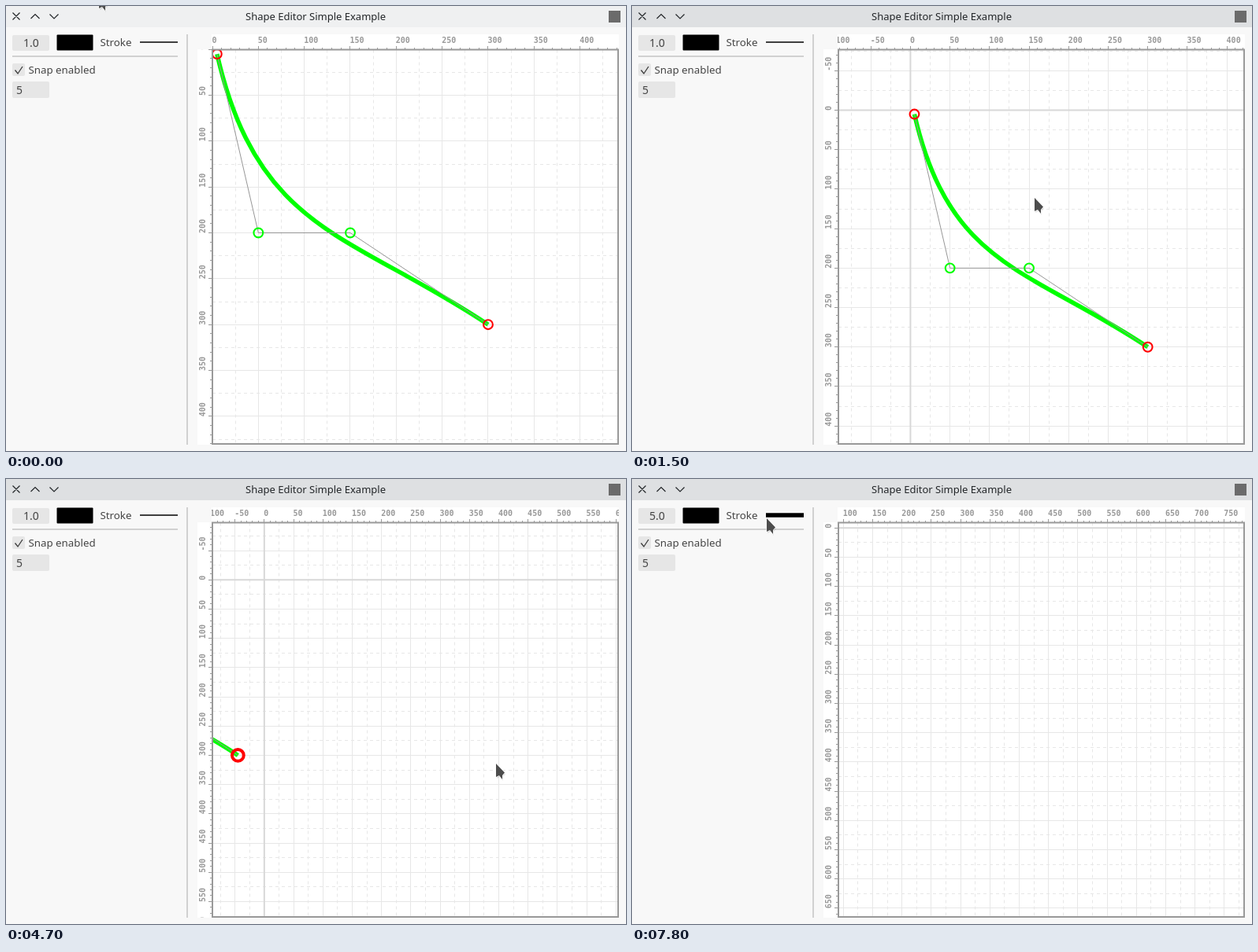
Animation, 787 px wide and 566 px high, one loop 8 s. Source, as an HTML page:

```html
<!DOCTYPE html>
<html lang="en">
<head>
<meta charset="utf-8">
<title>Shape Editor Simple Example</title>
<style>
  html, body { margin: 0; width: 100%; height: 100%; overflow: hidden; background: #f8f8f8; }
  svg { display: block; width: 787px; height: 566px; }
  .ui { font: 13.3px "Noto Sans", sans-serif; fill: #444; }
  .num { font-size: 14px; }
  .title { font: 13px "Noto Sans", sans-serif; fill: #232629; }
  .ruler { font: bold 10px "DejaVu Sans Mono", monospace; fill: #999; }
  .line { fill: none; }
</style>
</head>
<body>
<svg viewBox="0 0 787 566">
  <defs>
    <clipPath id="clipTop"><rect x="261" y="36" width="517" height="20"/></clipPath>
    <clipPath id="clipLeft"><rect x="243" y="55" width="19" height="503"/></clipPath>
    <clipPath id="clipView"><rect x="262" y="55" width="515" height="502"/></clipPath>
  </defs>
  <rect width="787" height="566" fill="#f8f8f8"/>

  <rect id="bar" width="787" height="27"/>
  <path class="line" stroke="#232629" stroke-width="1.2"
    d="M8.5 8.5L17.5 17.5M17.5 8.5L8.5 17.5M31.5 16L37 10.5L42.5 16M55.5 10.5L61 16L66.5 10.5"/>
  <text class="title" x="304" y="18">Shape Editor Simple Example</text>
  <rect x="765" y="6" width="15" height="15" fill="#6b6b6b"/>

  <rect id="field" rx="2"/>
  <text id="value" class="ui num" x="32" y="51.5" text-anchor="middle"></text>
  <rect x="64.5" y="36.5" width="46" height="20" rx="1" fill="#000"/>
  <text class="ui" x="119.5" y="51">Stroke</text>
  <path id="sample" d="M170 46H218" stroke="#000"/>
  <path d="M8 64H218" stroke="#c4c4c4" stroke-width="1.5"/>
  <rect x="8" y="73" width="16" height="16" rx="2" fill="#e6e6e6"/>
  <path class="line" d="M11.5 81.5L15 86L21 77" stroke="#3c3c3c" stroke-width="1.3"/>
  <text class="ui" x="28.5" y="86">Snap enabled</text>
  <rect x="8" y="96" width="47" height="21" rx="2" fill="#e6e6e6"/>
  <text class="ui num" x="13" y="111.5">5</text>
  <path d="M230 36V558" stroke="#c4c4c4" stroke-width="1.5"/>

  <rect x="261" y="36" width="517" height="20" fill="#fff"/>
  <rect x="243" y="55" width="19" height="503" fill="#fff"/>
  <rect x="262" y="56" width="515" height="501" fill="#fff"/>
  <g id="top" class="ruler" clip-path="url(#clipTop)"></g>
  <g id="left" class="ruler" clip-path="url(#clipLeft)"></g>
  <path id="ticks" class="line" stroke="#999"/>
  <g clip-path="url(#clipView)">
    <path id="dashes" class="line" stroke="#e7e7e7" stroke-dasharray="4 4"/>
    <path id="grid" class="line" stroke="#e7e7e7"/>
    <path id="axes" class="line" stroke="#d8d8d8" stroke-width="2"/>
    <path id="guides" class="line" stroke="#b0b0b0" stroke-width="1.3" stroke-dasharray="10 5"/>
    <path id="curve" class="line" stroke="#0f0" stroke-width="5.5"/>
    <path id="handles" class="line" stroke="#969696"/>
    <g id="rings"></g>
  </g>
  <rect x="262" y="55.5" width="515" height="501.5" fill="none" stroke="#999" stroke-width="2"/>
  <g id="cursor">
    <path d="M1 2V19L5 17L9 22V17L12 13.5Z" fill="#000" opacity=".1"/>
    <path d="M0 0V17L4 15L8 20V15L11 11.5Z" fill="#4d4d4d" stroke="#fff" stroke-width="1.2"
      paint-order="stroke" stroke-linejoin="round"/>
  </g>
</svg>
<script>
const LOOP = 8000, STEP = 100, SNAP = 5;
const BOX = { x0: 262, y0: 55.5, x1: 777, y1: 557 };
const POINTS = [[5, 5], [50, 200], [150, 200], [300, 300]];

// The user's actions
const HOME = { x: 262, y: 55.2, scale: 1.1666 };
const PANS = [[300, 900], [4500, 5100]];
const ZOOM = { from: 1300, to: 1900, x: 513.2, y: 243.4, factor: 0.6377 };
const SELECT = 3200, GRAB = 3700, RELEASE = 4300;
const WIDTH = { from: 7100, to: 7600, min: 1, max: 5 };

// Pointer moves: start, end, x, y; it rests in between
const MOVES = [
  [0, 300, 507.6, 256.6], [300, 700, 553, 320], [700, 900, 573.2, 316],
  [900, 1300, 511, 244], [1900, 2400, 404, 178], [2700, 3200, 649, 432],
  [3200, 3700, 568, 380], [3700, 3900, 326, 380], [4000, 4100, 310, 380],
  [4200, 4500, 689, 395], [4500, 5100, 488, 296], [5200, 5400, 486, 275],
  [5400, 6300, 167, 78], [6400, 7000, 32, 42], [7100, 7600, 75, 40], [7700, 7800, 171, 50]
];

const $ = id => document.getElementById(id);
const set = (id, attrs) => { for (const k in attrs) $(id).setAttribute(k, attrs[k]); };
const clamp = (v, lo, hi) => Math.min(hi, Math.max(lo, v));
const progress = (t, from, to) => clamp((t - from) / (to - from), 0, 1);
const crisp = v => Math.floor(v) + 0.5;
const vline = x => `M${x} ${BOX.y0}V${BOX.y1}`;
const hline = y => `M${BOX.x0} ${y}H${BOX.x1}`;

function pointer(t) {
  let x = 118, y = -14;
  for (const [from, to, tx, ty] of MOVES) {
    const k = progress(t, from, to);
    x += (tx - x) * k;
    y += (ty - y) * k;
  }
  return { x, y };
}

// Pointer travel between two times, as far as it has got at t
function travel(t, from, to) {
  const a = pointer(from), b = pointer(clamp(t, from, to));
  return { x: b.x - a.x, y: b.y - a.y };
}

function viewAt(t) {
  const [first, second] = PANS.map(p => travel(t, ...p));
  const f = ZOOM.factor ** progress(t, ZOOM.from, ZOOM.to);
  const axis = k => ZOOM[k] + (HOME[k] + first[k] - ZOOM[k]) * f + second[k];
  return { x: axis("x"), y: axis("y"), scale: HOME.scale * f };
}

function drawGrid(view) {
  const d = { grid: "", dashes: "", axes: "", ticks: "" };
  const labels = { top: "", left: "" };

  function axis(origin, lo, hi, line, tick, side, label) {
    const first = Math.floor((lo - origin) / view.scale / 50) * 50 - 50;
    for (let u = first; origin + u * view.scale < hi + 25; u += 5) {
      const raw = origin + u * view.scale, p = crisp(raw);
      const major = u % 50 === 0;
      if (major) labels[side] += label(raw, u);
      if (raw < lo - 0.5 || raw > hi) continue;
      if (u % 10 === 0) d.ticks += tick(p, major ? 4 : 2);
      if (u === 0) d.axes += line(raw);
      else if (u % 25 === 0) d[major ? "grid" : "dashes"] += line(p);
    }
  }

  axis(view.x, BOX.x0, BOX.x1, vline, (p, n) => `M${p} ${55 - n}V55`, "top",
    (p, u) => `<text x="${p - 0.5}" y="47.3">${u}</text>`);
  axis(view.y, BOX.y0, BOX.y1, hline, (p, n) => `M${261 - n} ${p}H261`, "left",
    (p, u) => `<text transform="translate(253.3 ${p + 0.5}) rotate(-90)">${u}</text>`);

  for (const id in d) set(id, { d: d[id] });
  for (const id in labels) $(id).innerHTML = labels[id];
}

function drawShape(t, view) {
  const dragged = travel(t, GRAB, RELEASE - STEP).x / view.scale;
  const shift = t < GRAB ? 0 : Math.round(dragged / SNAP) * SNAP;
  const pts = POINTS.map(([x, y]) => [view.x + (x + shift) * view.scale, view.y + y * view.scale]);
  const [a, b, c, e] = pts.map(p => p.join(" "));
  const selected = t >= SELECT, held = t >= GRAB && t < RELEASE;

  set("curve", { d: `M${a}C${b} ${c} ${e}` });
  set("handles", { d: `M${a}L${b}L${c}L${e}` });
  set("guides", { d: held ? vline(pts[3][0]) + hline(pts[3][1]) : "" });
  $("rings").innerHTML = pts.map(([x, y], i) => {
    const color = i % 3 ? "#0f0" : "#f00";
    const fill = held && i === 3 ? "rgba(225,85,75,.75)" : "none";
    return `<circle cx="${x}" cy="${y}" r="${selected ? 7.4 : 5.9}" fill="${fill}"
      stroke="${color}" stroke-width="${selected ? 4 : 2.1}"/>`;
  }).join("");
}

function drawPanel(t) {
  const w = WIDTH.min + (WIDTH.max - WIDTH.min) * progress(t, WIDTH.from, WIDTH.to);
  const hover = t >= 7000 && t < 7800;
  $("value").textContent = w.toFixed(1);
  set("sample", { "stroke-width": w + 0.7 });
  set("field", hover
    ? { x: 7.5, y: 35.5, width: 48, height: 22, fill: "#dcdcdc", stroke: "#696969" }
    : { x: 8, y: 37, width: 47, height: 20, fill: "#e6e6e6", stroke: "none" });
}

function render(time) {
  const t = Math.floor((time % LOOP) / STEP) * STEP;
  const view = viewAt(t), { x, y } = pointer(t);
  set("bar", { fill: t < PANS[0][0] ? "#eff0f1" : "#dee0e2" });
  drawPanel(t);
  drawGrid(view);
  drawShape(t, view);
  set("cursor", { transform: `translate(${x} ${y})` });
}

const start = performance.now();
function tick(now) {
  render(Math.max(0, now - start));
  requestAnimationFrame(tick);
}
render(0);
requestAnimationFrame(tick);
</script>
</body>
</html>
```
